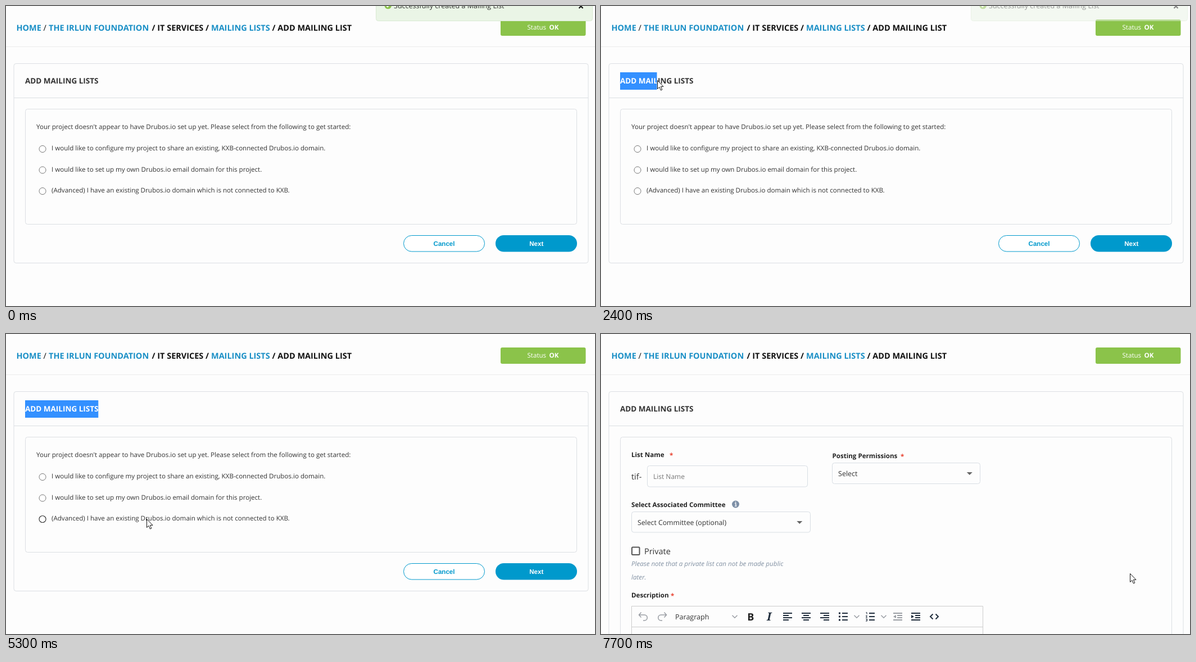
An HTML page for the animation above (8 s loop, 1048x534 px).

```html
<!DOCTYPE html>
<html lang="en">
<head>
<meta charset="utf-8">
<title>Add mailing list</title>
<style>
  html, body { margin: 0; width: 100%; height: 100%; overflow: hidden; background: #fdfdfd; }
  svg { display: block; width: 1048px; height: 534px; }
  text { font: 11.58px "Open Sans", "Noto Sans", sans-serif; fill: #333; white-space: pre; text-rendering: geometricPrecision; }
  .crumb text { font-size: 14.48px; font-weight: 700; fill: #111; }
  .crumb .link { fill: #1a8fc6; }
  .title { font-size: 13.5px; font-weight: 700; }
  .bold { font-weight: 700; fill: #222; }
  .star { font-weight: 700; fill: #e8412f; }
  .mid { font-size: 12.54px; }
  .large { font-size: 14.48px; }
  .note { font-style: italic; fill: #8291a3; }
  .btn { font: 700 11.58px "Liberation Sans", Arial, sans-serif; text-anchor: middle; }
  .box { fill: none; stroke: #dcdfe3; }
  .field { fill: #fdfdfd; stroke: #d8dee4; }
  .caret { fill: #666; }
  .radio { fill: #fff; stroke: #767676; }
  .radio.over { stroke: #333; stroke-width: 1.2; }
  .icon { fill: none; stroke: #222f3e; stroke-width: 2; }
  .thin { stroke-width: 1.5; }
  .dim { stroke: #999da3; }
  .tri { fill: #222f3e; stroke: none; }
  .tri.pale { fill: #999da3; }
</style>
</head>
<body>
<svg viewBox="0 0 1048 534">
  <defs>
    <clipPath id="selClip"><rect id="selArea" x="34" y="118" width="0" height="31"/></clipPath>
    <path id="chevron" d="M-4.5 -2.2L0 2.2L4.5 -2.2" class="icon thin dim"/>
    <path id="drop" d="M-5 -2.5H5L0 2.5Z" class="caret"/>
  </defs>
  <rect width="1048" height="534" fill="#fdfdfd"/>

  <g class="crumb">
    <text x="18.5" y="44" class="link">HOME</text>
    <text x="66.5" y="44" style="font-weight:400">/</text>
    <text x="76" y="44" class="link">THE IRLUN FOUNDATION</text>
    <text x="259.5" y="44">/ IT SERVICES /</text>
    <text x="365" y="44" class="link">MAILING LISTS</text>
    <text x="473.5" y="44">/ ADD MAILING LIST</text>
  </g>
  <rect x="880" y="24" width="151.5" height="29" rx="3" fill="#8bc34a"/>
  <text x="927.5" y="42.3" style="fill:#fff">Status</text>
  <text x="966.5" y="42.3" style="fill:#fff;font-weight:700">OK</text>
  <path d="M0 72.5H1048" stroke="#ececec"/>

  <g id="toast">
    <rect x="658.5" y="-20" width="385" height="46.5" rx="4" fill="#eaf5e6" stroke="#d9e9d2"/>
    <circle cx="679.7" cy="-1" r="6.3" fill="#8bc34a"/>
    <path d="M676.5 -1L679 1.5L683 -3" fill="none" stroke="#fff" stroke-width="1.6"/>
    <text x="690" y="4" class="mid">Successfully created a Mailing List</text>
    <path d="M1019.5 -3L1026.5 4M1026.5 -3L1019.5 4" stroke="#111" stroke-width="2.2"/>
  </g>

  <path d="M14 163.5H1036" stroke="#dcdfe3"/>
  <text x="34" y="138" class="title">ADD MAILING LISTS</text>
  <g clip-path="url(#selClip)">
    <rect x="34" y="118" width="130.5" height="31" fill="#3390ff"/>
    <text x="34" y="138" class="title" style="fill:#fff">ADD MAILING LISTS</text>
  </g>

  <g id="choice">
    <rect x="14" y="102.5" width="1022" height="355" rx="4" class="box"/>
    <rect x="34.5" y="183.5" width="981" height="205" rx="4" class="box"/>
    <text x="54" y="219.3">Your project doesn't appear to have Drubos.io set up yet. Please select from the following to get started:</text>
    <circle class="radio" cx="65" cy="254.5" r="6"/>
    <text x="81" y="257.3">I would like to configure my project to share an existing, KXB-connected Drubos.io domain.</text>
    <circle class="radio" cx="65" cy="292" r="6"/>
    <text x="81" y="294.8">I would like to set up my own Drubos.io email domain for this project.</text>
    <circle class="radio" cx="65" cy="329.5" r="6"/>
    <text x="81" y="332.3">(Advanced) I have an existing Drubos.io domain which is not connected to KXB.</text>
    <rect x="707.5" y="408.5" width="144" height="28.5" rx="14.25" fill="#fff" stroke="#09c"/>
    <text x="779.5" y="427" class="btn" style="fill:#09c">Cancel</text>
    <rect id="next" x="871" y="408" width="145" height="29.5" rx="14.75" fill="#09c"/>
    <text x="943.8" y="427" class="btn" style="fill:#fff">Next</text>
  </g>

  <g id="form">
    <rect x="14" y="102.5" width="1022" height="480" rx="4" class="box"/>
    <rect x="34.5" y="183.5" width="981" height="380" rx="4" class="box"/>
    <text x="54" y="219.3" class="bold">List Name</text><text x="122" y="220" class="star">*</text>
    <text x="54" y="258.5" class="large">tif-</text>
    <rect x="82.5" y="234.5" width="285" height="37.5" rx="4" class="field"/>
    <text x="93" y="258" style="font-size:12px;fill:#777">List Name</text>

    <text x="411.5" y="221" class="bold">Posting Permissions</text><text x="533" y="222" class="star">*</text>
    <rect x="411.5" y="229.5" width="263" height="37" rx="4" class="field"/>
    <text x="422" y="252.7" class="mid">Select</text>
    <use href="#drop" x="655.8" y="248.5"/>

    <text x="54" y="307.5" class="bold">Select Associated Committee</text>
    <circle cx="239.5" cy="303" r="6.5" fill="#7d8fa6"/>
    <path d="M238 302H240V306M237.8 306.3H241.4" fill="none" stroke="#fff" stroke-width="1.3"/>
    <circle cx="239.5" cy="299.6" r="1" fill="#fff"/>
    <rect x="54.5" y="316.5" width="318" height="36.5" rx="4" class="field"/>
    <text x="65" y="339.8" style="font-size:12.27px">Select Committee (optional)</text>
    <use href="#drop" x="353.3" y="335.5"/>

    <rect x="55" y="379.5" width="13.5" height="13.5" rx="1.5" fill="#fff" stroke="#555" stroke-width="2"/>
    <text x="77" y="392" class="large">Private</text>
    <text x="54" y="413.3" class="note">Please note that a private list can not be made public</text>
    <text x="54" y="436.5" class="note">later.</text>
    <text x="54" y="469.3" class="bold">Description</text><text x="124" y="470" class="star">*</text>

    <g id="editor">
      <path d="M54.5 534V484.5H679.5V534M54.5 521.5H679.5" fill="#fdfdfd" stroke="#ccc"/>
      <path class="icon thin dim" d="M71.5 495.5L67.5 500L71.5 504.5M67.5 500H77C84 500 84 510 77 510H75"/>
      <path class="icon thin dim" d="M112.5 495.5L116.5 500L112.5 504.5M116.5 500H107C100 500 100 510 107 510H109"/>
      <text x="132" y="507.6" class="mid">Paragraph</text>
      <use href="#chevron" x="238" y="503"/>
      <text x="260.3" y="509.7" class="bold" style="font-size:18px">B</text>
      <text x="295" y="510" style="font:italic 600 20px 'Noto Serif',serif;fill:#222f3e">I</text>
      <g id="aligns" class="icon"></g>
      <g class="icon">
        <path d="M429 497H439M429 503H439M429 509H439M477 497H487M477 503H487M477 509H487"/>
        <path d="M423 497H426M423 503H426M423 509H426" stroke-width="3"/>
        <path d="M471.5 495.5H473V499M471 501.5H473.5L471.5 504.5H474M471 507H473.5V511H471M472 509H473.5" stroke-width="1"/>
      </g>
      <use href="#chevron" x="455" y="503"/>
      <use href="#chevron" x="503" y="503"/>
      <path class="icon dim" d="M520 497H536M527 501H536M527 505H536M520 509H536"/>
      <path class="tri pale" d="M525 500V506L520 503Z"/>
      <path class="icon" d="M552 497H568M559 501H568M559 505H568M552 509H568"/>
      <path class="tri" d="M552 500V506L557 503Z"/>
      <path class="icon" d="M590.5 498.5L586 503L590.5 507.5M595.5 498.5L600 503L595.5 507.5"/>
    </g>
  </g>

  <g id="status">
    <path d="M0 517H187Q191 517 191 521V534H0Z" fill="#dce0e4"/>
    <text x="-1" y="531.5" style="font-size:11px;fill:#5f6368">m...</text>
  </g>

  <g id="cursor" stroke="#111" fill="#fff" stroke-linejoin="round">
    <path id="arrow" d="M.5 .5V15.5L3.9 12.3L6.4 18L8.8 17L6.4 11.4H11Z"/>
    <path id="hand" stroke-width="1.2" d="M-1.6 13V2a1.7 1.7 0 0 1 3.4 0V8.5c0-1.6 2.6-1.6 2.6 0V9.3c0-1.5 2.4-1.5 2.4 .2v.9c0-1.4 2-1.4 2 .3V15c0 2-1.4 3-1.6 5v2H-1v-1.5c-.6-2-2.6-4-4.2-6.5-1-1.7 .8-2.7 2-1.5zM1.8 8.5V13M4.4 9.3V13M6.8 10.4V13"/>
  </g>
</svg>
<script>
  const LOOP = 8000, STEP = 100;
  const $ = id => document.getElementById(id);
  const radios = [...document.querySelectorAll('.radio')];

  // first step, last step, end x, end y
  const moves = [
    [400, 400, 321, 18], [500, 800, 8, 129], [1100, 1200, 25, 126], [1400, 1600, 34, 128],
    [2100, 2800, 165, 136], [3400, 3400, 166, 138], [3500, 3600, 277, 205],
    [3800, 4500, 60, 278], [4700, 5000, 65, 321], [5200, 5300, 250, 329],
    [5400, 5500, 329, 336], [5700, 5800, 344, 368], [6200, 6400, 973, 388],
    [6600, 6600, 956, 414], [6700, 6700, 941, 426]
  ];

  // left, centred and right aligned lines
  const rows = [16, 10, 16, 10];
  $('aligns').innerHTML = [0, .5, 1].map((side, i) => '<path d="' + rows.map((w, r) =>
    `M${324 + i * 33 + (16 - w) * side} ${497 + r * 4}h${w}`).join('') + '"/>').join('');

  const clamp = (v, lo, hi) => Math.min(hi, Math.max(lo, v));
  const show = (id, on) => $(id).style.display = on ? '' : 'none';

  function pointer(t) {
    let x = 360, y = 0;
    for (const [from, to, endX, endY] of moves) {
      if (t < from) break;
      const k = Math.min(1, (t - from + STEP) / (to - from + STEP));
      x += (endX - x) * k;
      y += (endY - y) * k;
    }
    return [x, y];
  }

  function draw(now) {
    const t = Math.floor(now % LOOP / STEP) * STEP;
    const [x, y] = pointer(t);
    const loaded = t >= 7300, hand = t >= 6600 && !loaded;

    show('cursor', t >= 400);
    $('cursor').setAttribute('transform', `translate(${Math.round(x)} ${Math.round(y)})`);
    show('arrow', !hand);
    show('hand', hand);

    const selected = t < 2100 || t >= 6000 ? 0 : t > 2800 ? 130.5 : clamp(x - 34, 0, 130.5);
    $('selArea').setAttribute('width', selected);
    $('toast').style.opacity = clamp((2600 - t) / 400, 0, 1);

    radios.forEach(r => r.classList.toggle('over',
      t >= 400 && x > 58 && x < 570 && Math.abs(y - r.getAttribute('cy')) < 9));
    $('next').setAttribute('fill', t >= 6700 ? '#1aa3d1' : '#09c');

    show('choice', !loaded);
    show('form', loaded);
    show('editor', t >= 7400);
    show('status', t >= 7200 && t < 7700);
    $('status').style.opacity = t >= 7600 ? .5 : 1;
  }

  function tick() {
    draw(performance.now());
    requestAnimationFrame(tick);
  }
  tick();
</script>
</body>
</html>
```
